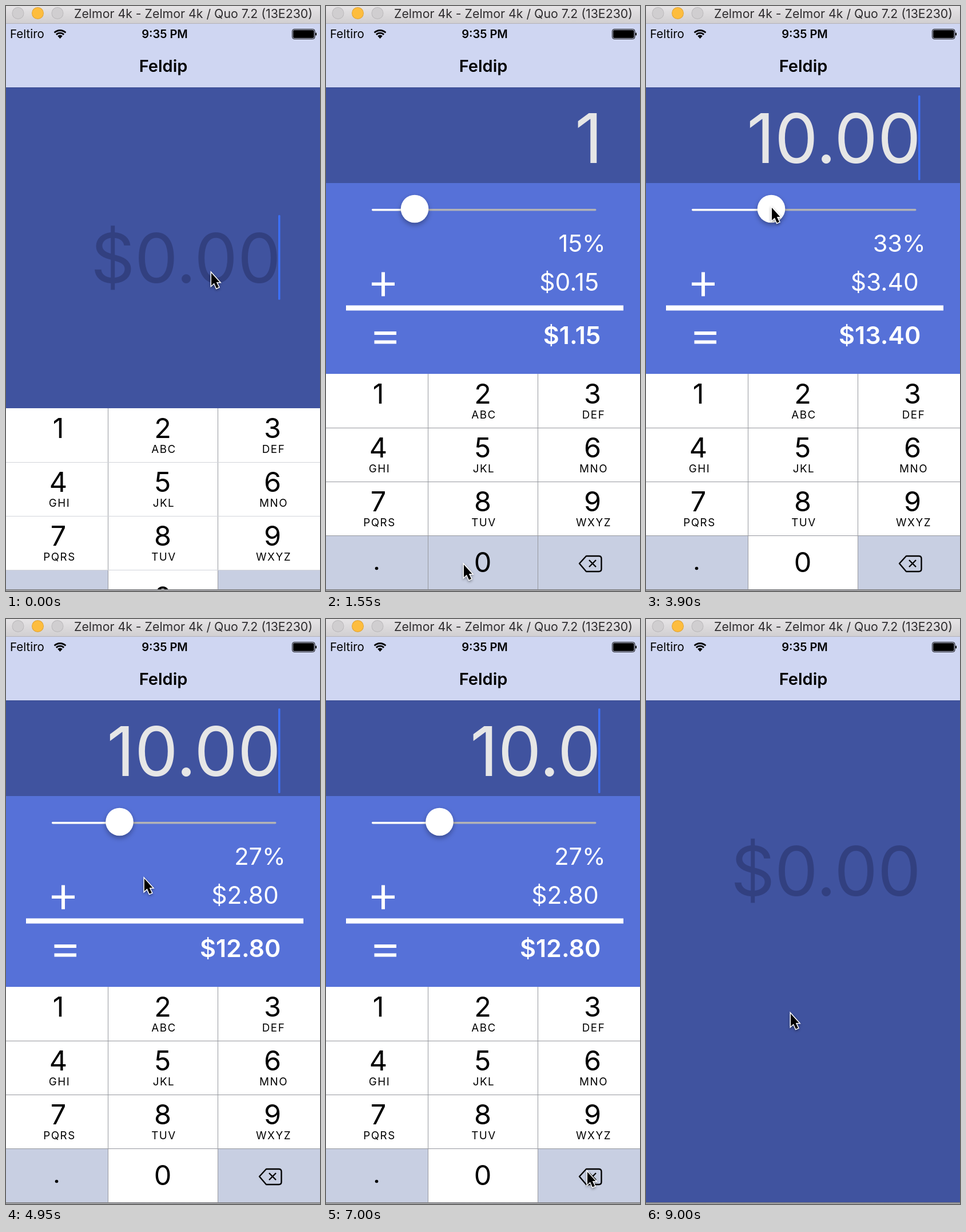
Write an HTML page with a canvas that moves like this. It is 549x1021 px and loops after 9.05 s.

```html
<!DOCTYPE html>
<html lang="en">
<head>
<meta charset="utf-8">
<title>Tip calculator</title>
<style>
html, body { margin: 0; width: 100%; height: 100%; overflow: hidden; }
canvas { display: block; }
</style>
</head>
<body>
<canvas id="stage" width="549" height="1021"></canvas>
<script>
const ctx = document.getElementById('stage').getContext('2d');
const W = 549, SCREEN_END = 1018, LOOP = 9050;
const DARK = '#40539f', PANE = '#5671d8', KEY_GRAY = '#c8cfe2';
const KNOB_START = 103.5, KNOB_RANGE = 343.5;

const clamp = x => Math.min(1, Math.max(0, x));
const mix = (a, b, p) => a + (b - a) * p;
const ease = p => p * p * (3 - 2 * p);
const ramp = (t, from, to) => ease(clamp((t - from) / (to - from)));

// [time, x, y] of the pointer tip
const pointerPath = [
  [0, 358, 463], [150, 358, 463], [700, 112, 704], [980, 112, 704],
  [1400, 240, 972], [1700, 240, 972], [2000, 72, 965], [2150, 72, 965],
  [2350, 240, 972], [2700, 240, 972], [2850, 228, 905], [3250, 155, 349],
  [3450, 155, 349], [3900, 219, 349], [4150, 245, 350], [4500, 198.5, 350],
  [4750, 198.5, 350], [5200, 300, 590], [5450, 300, 590], [5900, 406, 226],
  [6200, 406, 226], [6700, 456, 962], [8100, 456, 962], [8550, 252, 610],
  [8650, 252, 610], [8900, 252, 686]
];

// [time, text] of the amount field
const edits = [
  [920, '1'], [1560, '10'], [2120, '10.'], [2430, '10.0'], [2690, '10.00'],
  [6950, '10.0'], [7220, '10.'], [7450, '10'], [7680, '1'], [7920, '']
];

// [from, to, key]
const presses = [
  [700, 930, '1'], [1420, 1580, '0'], [2000, 2130, '.'], [2330, 2450, '0'],
  [2560, 2700, '0'], [6850, 6950, 'del'], [7120, 7220, 'del'],
  [7350, 7450, 'del'], [7580, 7680, 'del'], [7820, 7920, 'del']
];

const letters = ['', 'ABC', 'DEF', 'GHI', 'JKL', 'MNO', 'PQRS', 'TUV', 'WXYZ'];
const columns = [0, 178.5, 370.5, W];
const digitX = [91.5, 274, 466];

function pointerAt(t) {
  let i = 0;
  while (i < pointerPath.length - 2 && pointerPath[i + 1][0] <= t) i++;
  const [t0, x0, y0] = pointerPath[i], [t1, x1, y1] = pointerPath[i + 1];
  const p = ramp(t, t0, t1);
  return { x: mix(x0, x1, p), y: mix(y0, y1, p) };
}

function rect(x, y, w, h, color) {
  ctx.fillStyle = color;
  ctx.fillRect(x, y, w, h);
}

function disc(x, y, r, color) {
  ctx.fillStyle = color;
  ctx.beginPath();
  ctx.arc(x, y, r, 0, Math.PI * 2);
  ctx.fill();
}

function rounded(x, y, w, h, r) {
  ctx.beginPath();
  ctx.roundRect(x, y, w, h, r);
}

function text(str, x, y, size, { weight = 400, color = '#000', align = 'center', spacing = 0 } = {}) {
  ctx.font = `${weight} ${size}px Inter, "Open Sans", sans-serif`;
  ctx.letterSpacing = spacing + 'px';
  ctx.fillStyle = color;
  ctx.textAlign = align === 'ink' ? 'left' : align;
  // 'ink' puts the right edge of the last glyph on x
  if (align === 'ink') x -= ctx.measureText(str).actualBoundingBoxRight;
  ctx.fillText(str, x, y);
}

function drawTitleBar() {
  const g = ctx.createLinearGradient(0, 0, 0, 30);
  g.addColorStop(0, '#e6e4e6');
  g.addColorStop(1, '#d1cfd1');
  rect(0, 0, W, 31, g);
  rect(0, 30, W, 1, '#b4b2b8');
  for (const [x, fill, edge] of [[21, '#d0ced0', '#b9b7b9'], [55.5, '#fdbd3e', '#dfa02f'], [90, '#d0ced0', '#b9b7b9']]) {
    disc(x, 12.5, 10.5, edge);
    disc(x, 12.5, 9.6, fill);
  }
  text('Zelmor 4k - Zelmor 4k / Quo 7.2 (13E230)', 327.5, 21, 21.3, { color: '#2e2c2e' });
}

function drawNavBar() {
  rect(0, 31, W, 111, '#cfd6f2');
  rect(0, 142, W, 1, '#394a90');
  text('Feltiro', 7, 56, 20.5, { align: 'left' });
  text('9:35 PM', 277.5, 56, 20, { weight: 600 });
  text('Feldip', 275, 115, 29, { weight: 600 });

  ctx.strokeStyle = '#000';
  ctx.lineWidth = 2.8;
  for (const r of [9.3, 14]) {
    ctx.beginPath();
    ctx.arc(94.5, 56.5, r, -Math.PI * 0.75, -Math.PI * 0.25);
    ctx.stroke();
  }
  ctx.fillStyle = '#000';
  ctx.beginPath();
  ctx.moveTo(94.5, 57);
  ctx.arc(94.5, 56.5, 6, -Math.PI * 0.75, -Math.PI * 0.25);
  ctx.fill();

  ctx.lineWidth = 1;
  rounded(500.5, 40.5, 39.5, 17, 3.5);
  ctx.stroke();
  rounded(502, 42, 36.5, 14, 2);
  ctx.fill();
  rounded(541, 46.5, 2, 5, 1);
  ctx.fill();
}

function drawField(amount, dy, caret) {
  const color = amount ? '#e6e6e6' : '#324080';
  text(amount || '$0.00', 474, 274 + dy, 120, { color, align: 'ink' });
  if (caret) {
    ctx.globalAlpha = caret;
    ctx.fillStyle = '#3c70f8';
    rounded(476, 156 + dy, 3.5, 148, 1.5);
    ctx.fill();
    ctx.globalAlpha = 1;
  }
}

function drawPane(top, bill, rate) {
  ctx.save();
  ctx.translate(0, top - 309);
  rect(0, 309, W, 712, PANE);

  const knob = KNOB_START + KNOB_RANGE * rate;
  ctx.fillStyle = '#b3b3b5';
  rounded(80, 354, 392.5, 3.6, 1.8);
  ctx.fill();
  ctx.fillStyle = '#fff';
  rounded(80, 354, knob - 80, 3.6, 1.8);
  ctx.fill();
  ctx.save();
  ctx.shadowColor = 'rgba(0,0,0,.32)';
  ctx.shadowBlur = 8;
  ctx.shadowOffsetY = 4;
  disc(knob, 354, 24.3, '#fff');
  ctx.restore();

  const tip = bill * Math.round(rate * 100 + 1e-6) / 100;
  const white = { color: '#fff', align: 'ink' };
  text(Math.floor(rate * 100 + 1e-6) + '%', 485, 429, 41.5, white);
  text('$' + tip.toFixed(2), 475, 497, 42.5, white);
  text('$' + (bill + tip).toFixed(2), 479, 590, 43, { ...white, weight: 600 });

  rect(80, 482.5, 40, 5.5, '#fff');
  rect(97, 464.5, 6, 42, '#fff');
  rect(35, 522.5, 485, 9, '#fff');
  rect(84.5, 568, 38.5, 6, '#fff');
  rect(84.5, 583.5, 38.5, 6, '#fff');
  ctx.restore();
}

function drawDelete() {
  ctx.strokeStyle = '#000';
  ctx.lineWidth = 2.4;
  ctx.lineJoin = 'round';
  ctx.beginPath();
  ctx.moveTo(443, 973);
  ctx.lineTo(455, 960);
  ctx.lineTo(477, 960);
  ctx.quadraticCurveTo(481.5, 960, 481.5, 964.5);
  ctx.lineTo(481.5, 982.5);
  ctx.quadraticCurveTo(481.5, 987, 477, 987);
  ctx.lineTo(455, 987);
  ctx.closePath();
  ctx.moveTo(460, 967);
  ctx.lineTo(472, 979);
  ctx.moveTo(472, 967);
  ctx.lineTo(460, 979);
  ctx.stroke();
}

function drawKeyboard(dy, pressed) {
  if (dy > 375) return;
  ctx.save();
  ctx.translate(0, dy);
  const names = ['1', '2', '3', '4', '5', '6', '7', '8', '9', '.', '0', 'del'];
  names.forEach((name, i) => {
    const col = i % 3, row = Math.floor(i / 3), y = 642 + row * 94;
    const special = name === '.' || name === 'del';
    const gray = special !== (pressed === name);
    rect(columns[col], y, columns[col + 1] - columns[col], 94, gray ? KEY_GRAY : '#fff');
    if (name === 'del') drawDelete();
    else if (name === '.') disc(88.5, 981.5, 2.8, '#000');
    else {
      text(name, digitX[col], row === 3 ? 988 : y + 52, 48.5);
      if (row < 3) text(letters[i], digitX[col] + 2, y + 78, 18.8, { spacing: 1.5 });
    }
  });
  const line = '#96989e';
  for (const x of columns.slice(1, 3)) rect(x - 0.5, 642, 1, 376, line);
  for (let row = 1; row < 4; row++) rect(0, 642 + row * 94, W, 1, dy > 2 ? '#d2d4da' : line);
  ctx.restore();
}

function drawPointer({ x, y }) {
  ctx.save();
  ctx.translate(x, y);
  ctx.beginPath();
  for (const [px, py] of [[1, 3], [1, 25], [6, 20.5], [10, 29.5], [14, 27.8], [9.8, 19], [15.5, 19]]) ctx.lineTo(px, py);
  ctx.closePath();
  ctx.lineJoin = 'miter';
  ctx.strokeStyle = '#fff';
  ctx.lineWidth = 3;
  ctx.shadowColor = 'rgba(0,0,0,.4)';
  ctx.shadowBlur = 4;
  ctx.shadowOffsetY = 2;
  ctx.stroke();
  ctx.shadowColor = 'transparent';
  ctx.fillStyle = '#000';
  ctx.fill();
  ctx.restore();
}

function keyboardOffset(t) {
  if (t < 5400) return t < 600 ? 60 * Math.exp(-t / 80) : 0;
  const hidden = t < 6150 ? ramp(t, 5400, 5700)
    : t < 8600 ? 1 - ramp(t, 6150, 6500)
    : ramp(t, 8620, 8920);
  return 376 * hidden;
}

function caretAlpha(t, lastEdit) {
  if ((t >= 5400 && t < 6150) || t >= 8620) return 0;
  const focus = t >= 6150 ? 6150 : -150;
  const phase = (t - Math.max(focus, lastEdit)) % 1000;
  return clamp((600 - phase) / 100) + clamp((phase - 880) / 100);
}

function draw(t) {
  const last = edits.filter(e => e[0] <= t).pop() || [-150, ''];
  const amount = last[1];
  const press = presses.find(([from, to]) => t >= from && t < to);
  const fieldDy = 208.7 * (1 - ramp(t, 250, 600) + ramp(t, 8620, 8950));
  const paneTop = mix(1021, 309, ramp(t, 950, 1350) - ramp(t, 7950, 8300));
  const rate = t < 3450 ? 0.15 : (pointerAt(Math.min(t, 4600)).x - KNOB_START) / KNOB_RANGE;

  rect(0, 0, W, 1021, DARK);
  ctx.save();
  ctx.beginPath();
  ctx.rect(0, 31, W, SCREEN_END - 31);
  ctx.clip();
  if (paneTop < 1020) drawPane(paneTop, parseFloat(amount) || 0, rate);
  drawField(amount, fieldDy, caretAlpha(t, last[0]));
  drawKeyboard(keyboardOffset(t), press && press[2]);
  drawNavBar();
  ctx.restore();
  drawTitleBar();

  const shade = ctx.createLinearGradient(0, SCREEN_END, 0, 1021);
  shade.addColorStop(0, '#77787c');
  shade.addColorStop(1, '#b0b0b2');
  rect(0, SCREEN_END, W, 3, shade);
  drawPointer(pointerAt(t));
}

function tick() {
  draw(Math.floor(performance.now() % LOOP / 50) * 50);
  requestAnimationFrame(tick);
}
tick();
</script>
</body>
</html>
```
